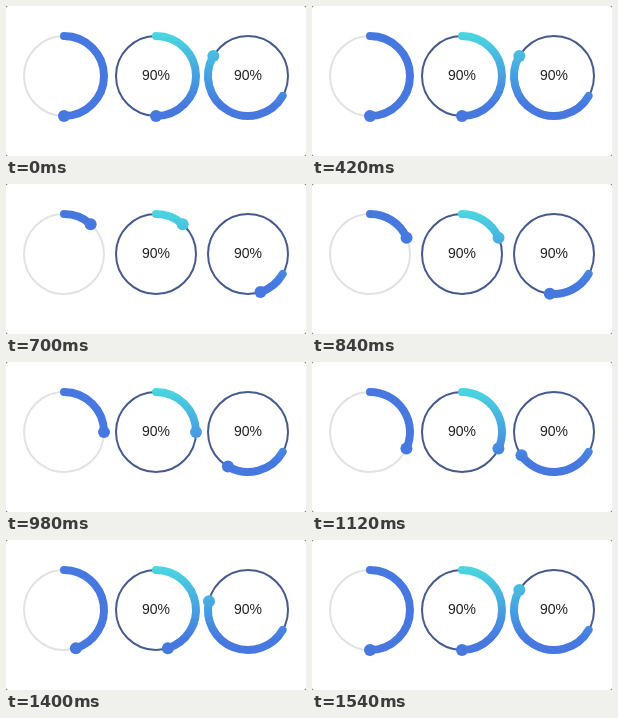
An HTML page that plays this animation: 300 by 150 pixels, repeating every 1.68 s.

```html
<!DOCTYPE html>
<html lang="en">
<head>
<meta charset="utf-8">
<title>Progress rings</title>
<style>
  html, body { margin: 0; width: 100%; height: 100%; overflow: hidden; background: #444; }
  svg { display: block; width: 300px; height: 150px; background: #fff; border-radius: 2px; }
  text { font: 14px "Liberation Sans", Arial, sans-serif; text-anchor: middle; fill: #222; }
  .track { fill: none; stroke-width: 2; }
  .arc { fill: none; stroke-width: 8; stroke-linecap: round; }
</style>
</head>
<body>
<svg viewBox="0 0 300 150">
  <defs>
    <linearGradient id="fade" gradientUnits="userSpaceOnUse" x1="0" y1="28" x2="0" y2="100">
      <stop offset="0" stop-color="#4ad6e0"/>
      <stop offset="1" stop-color="#4678e0"/>
    </linearGradient>
  </defs>
</svg>
<script>
const LOOP = 1680, STEP = 70, BEGIN = 458, SWEEP = 1042;
const CY = 70, R = 40;
const svg = document.querySelector('svg');

const rings = [
  { cx: 58, start: 0, track: '#e2e2e2', paint: '#4678e0' },
  { cx: 150, start: 0, track: '#465a8e', paint: 'url(#fade)', label: '90%' },
  { cx: 242, start: 120, track: '#465a8e', paint: 'url(#fade)', label: '90%' }
];

function add(tag, attrs) {
  const el = document.createElementNS('http://www.w3.org/2000/svg', tag);
  for (const key in attrs) el.setAttribute(key, attrs[key]);
  return svg.appendChild(el);
}

// Degrees run clockwise from the top.
function point(cx, deg) {
  const a = deg * Math.PI / 180;
  return [cx + R * Math.sin(a), CY - R * Math.cos(a)];
}

for (const ring of rings) {
  add('circle', { class: 'track', cx: ring.cx, cy: CY, r: R, stroke: ring.track });
  ring.arc = add('path', { class: 'arc', stroke: ring.paint });
  ring.head = add('circle', { r: 6, fill: ring.paint });
  if (ring.label) add('text', { x: ring.cx, y: 74 }).textContent = ring.label;
}

function draw(now) {
  const t = Math.floor(now % LOOP / STEP) * STEP;
  const progress = t < BEGIN ? 1 : Math.min(1, (t - BEGIN) / SWEEP);
  for (const { cx, start, arc, head } of rings) {
    const from = point(cx, start);
    const to = point(cx, start + 180 * progress);
    arc.setAttribute('d', `M${from} A${R} ${R} 0 0 1 ${to}`);
    head.setAttribute('cx', to[0]);
    head.setAttribute('cy', to[1]);
  }
}

const origin = performance.now();
function tick() {
  draw(performance.now() - origin);
  requestAnimationFrame(tick);
}
tick();
</script>
</body>
</html>
```
